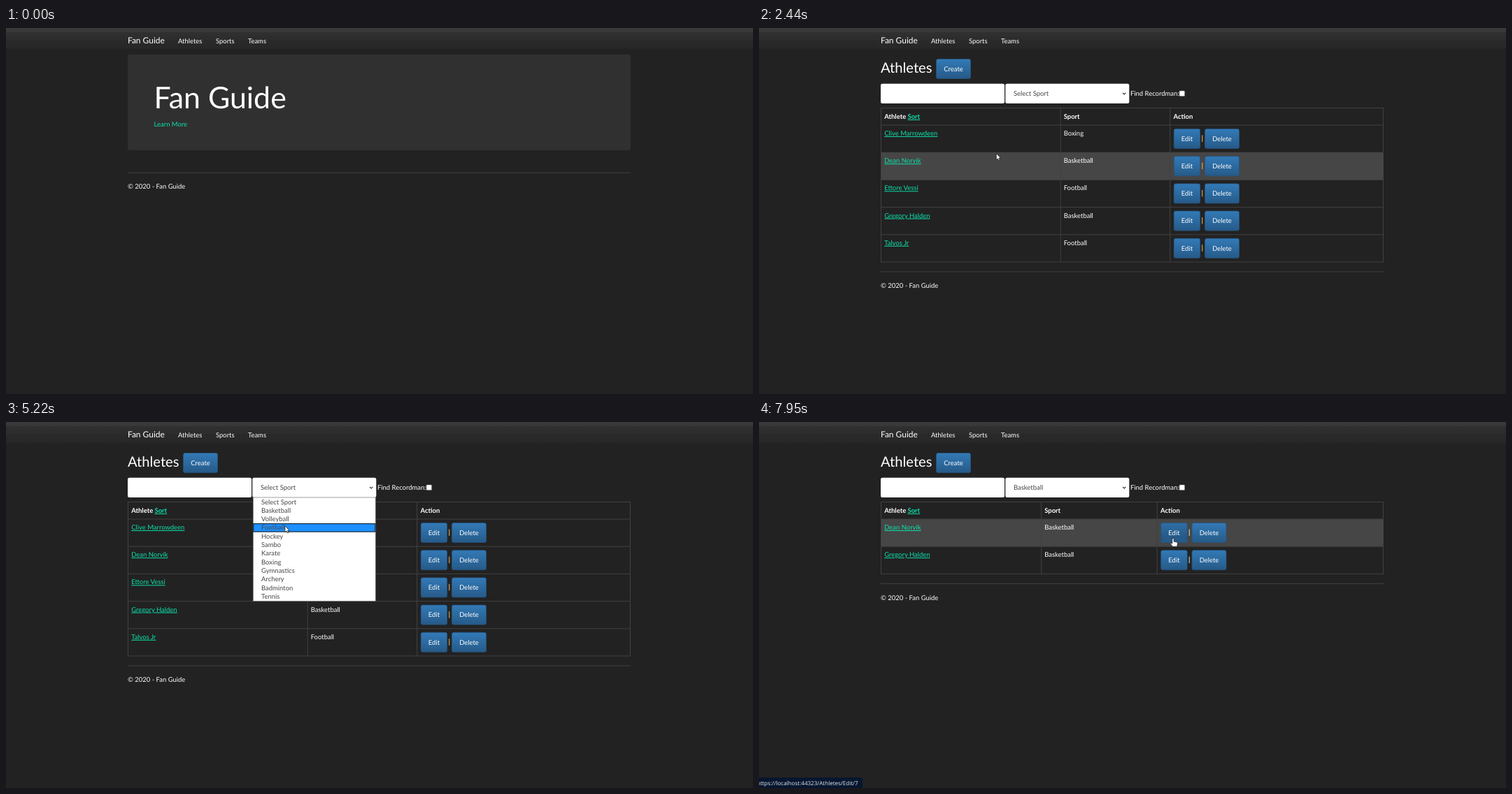
An HTML page that plays this animation: 1068 by 524 pixels, repeating every 8 s.

```html
<!DOCTYPE html>
<html lang="en">
<head>
<meta charset="utf-8">
<title>Fan Guide</title>
<style>
html, body { margin: 0; width: 100%; height: 100%; overflow: hidden; background: #222; }
svg { display: block; width: 1068px; height: 524px; }
text { font: 9.46px Lato, sans-serif; fill: #fff; white-space: pre; text-rendering: geometricPrecision; }
.brand { font-size: 11.98px; }
.hero { font-size: 42.9px; }
.title { font-size: 20.2px; }
.bold { font-weight: bold; }
.link { fill: #0ce3ac; }
.under { text-decoration: underline; }
.hover { fill: #34495e; }
.field { fill: #464646; }
.bar { fill: #fff; }
.mid { text-anchor: middle; }
.url { font: 8.06px "Open Sans", "Noto Sans", sans-serif; fill: #e8eaee; }
</style>
</head>
<body>
<svg viewBox="0 0 1068 524">
  <defs>
    <linearGradient id="nav" x2="0" y2="1">
      <stop stop-color="#3a3a3a"/><stop offset=".22" stop-color="#383838"/>
      <stop offset=".22" stop-color="#303030"/><stop offset=".59" stop-color="#2c2c2c"/>
      <stop offset=".59" stop-color="#2a2a2a"/><stop offset="1" stop-color="#272727"/>
    </linearGradient>
    <linearGradient id="btn" x2="0" y2="1">
      <stop stop-color="#337ab7"/><stop offset="1" stop-color="#265a88"/>
    </linearGradient>
    <linearGradient id="btnOver" x2="0" y2="1">
      <stop stop-color="#2e6fa6"/><stop offset=".7" stop-color="#265a88"/>
    </linearGradient>
  </defs>
  <g id="stage"></g>
</svg>
<script>
const LOOP = 8000, ROW = 39.2, ITEM = 12.33;
const stage = document.getElementById('stage');

const athletes = [
  ['Clive Marrowdeen', 'Boxing'], ['Dean Norvik', 'Basketball'], ['Ettore Vessi', 'Football'],
  ['Gregory Halden', 'Basketball'], ['Talvos Jr', 'Football']
];
const sports = ['Select Sport', 'Basketball', 'Volleyball', 'Football', 'Hockey', 'Sambo',
  'Karate', 'Boxing', 'Gymnastics', 'Archery', 'Badminton', 'Tennis'];

// pointer stays: time, x, y
const path = [
  [120, 980, 514], [270, 358, 18], [320, 330, -20],
  [500, 272, -14], [800, 262, 16], [1210, 252, 22], [1380, 252, 22], [1430, 252, 22.5],
  [1800, 252, 22.5], [2400, 339, 180], [2440, 339, 180], [2720, 420, 88], [2840, 420, 88],
  [3220, 502, 203], [3640, 470, 190], [3690, 460, 180], [4040, 288, 56], [4140, 290, 56],
  [4420, 433, 87], [4650, 433, 87], [5270, 396, 154], [5520, 396, 154], [5980, 390, 130],
  [6640, 390, 130], [7110, 575, 89], [7160, 577, 90], [7650, 594, 164], [7900, 592, 167]
];
const clicks = [[1630, 1780], [4520, 4670], [6160, 6310]];
const bubbles = [[1100, 1850, 'Athletes', 122], [4030, 4280, 'Athletes/Create', 150],
  [7600, 8200, 'Athletes/Edit/7', 148]];

const during = (t, [a, b]) => t >= a && t < b;
const clamp = v => Math.max(0, Math.min(1, v));
const text = (x, y, s, cls = '') => `<text x="${x}" y="${y}" class="${cls}">${s}</text>`;
const rect = (x, y, w, h, fill, extra = '') =>
  `<rect x="${x}" y="${y}" width="${w}" height="${h}" fill="${fill}" ${extra}/>`;
const hline = y => rect(174, y, 719, 1, '#414141');

function pointerAt(t) {
  let i = path.findIndex(p => p[0] > t);
  if (i < 0) i = path.length;
  if (!i) return [-50, -50];
  const a = path[i - 1], b = path[i] || a;
  const k = b === a ? 0 : (t - a[0]) / (b[0] - a[0]);
  return [a[1] + (b[1] - a[1]) * k, a[2] + (b[2] - a[2]) * k];
}

function draw(t) {
  const [px, py] = pointerAt(t);
  const open = during(t, [4580, 6380]);
  let hand = false;

  const over = (x, y, w, h) => !open && px >= x && px < x + w && py >= y && py < y + h;
  const hot = (...box) => {
    const on = over(...box);
    hand = hand || on;
    return on;
  };
  const button = (x, y, w, label) =>
    rect(x + .5, y + .5, w - 1, 28, hot(x, y, w, 29) ? 'url(#btnOver)' : 'url(#btn)',
      'rx="2.5" stroke="#245580" stroke-width=".8"') +
    text(x + w / 2, y + 17.7, label, 'mid');
  const footer = y => hline(y) + text(174, y + 23.7, '© 2020 - Fan Guide');

  function navbar() {
    const item = (x, w, label) => text(x, 21.6, label, hot(x, 13, w, 14) ? 'hover' : '');
    return rect(0, 0, 1068, 29.5, 'url(#nav)') + text(174, 21.8, 'Fan Guide', 'brand') +
      item(246, 35, 'Athletes') + item(300, 27, 'Sports') + item(346, 27, 'Teams');
  }

  function home() {
    return rect(174, 38, 719, 137, '#303030', 'rx="3.5"') +
      text(211.5, 115, 'Fan Guide', 'hero') + text(211.5, 141.3, 'Learn More', 'link') + footer(206.7);
  }

  function form(picked) {
    return text(174, 64, 'Athletes', 'title') + button(253, 44, 50, 'Create') +
      rect(174, 79.7, 177, 28.3, '#fff', 'rx="2.5"') + rect(352.3, 79.7, 177, 28.3, '#fff', 'rx="2.5"') +
      text(364, 97.3, picked, 'field') +
      '<path d="M520 92.8l2.2 2.2 2.2-2.2" fill="none" stroke="#333" stroke-width="1.2"/>' +
      text(531, 97.3, 'Find Recordman:') +
      rect(601, 90, 7.6, 7.6, '#fff', 'rx="1.2" stroke="#767676" stroke-width=".5"');
  }

  function table(rows, col2, col3, mark) {
    const bottom = 139 + ROW * rows.length;
    let s = '';
    rows.forEach(([name, sport], i) => {
      const y = 139 + ROW * i;
      if (over(174, y, 719, ROW)) s += rect(174, y, 719, ROW, '#464646');
      hot(179, y + 6, name.length * 4.8, 12);
      s += text(179.2, y + 15, name, 'link under') + text(col2 + 5, y + 15, sport) +
        button(col3 + 5.5, y + 5, 38.5, 'Edit') + button(col3 + 49.8, y + 5, 50, 'Delete') +
        rect(col3 + 46, y + 14.5, 1.1, 9.5, mark) + hline(y + ROW - .5);
    });
    for (const x of [174, col2, col3, 892]) s += rect(x, 114, 1, bottom - 114, '#414141');
    return s + hline(114) + hline(138.5) +
      text(179.2, 130, 'Athlete <tspan class="link under">Sort</tspan>', 'bold') +
      text(col2 + 5, 130, 'Sport', 'bold') + text(col3 + 5.3, 130, 'Action', 'bold') +
      footer(bottom + 13.5);
  }

  function dropdown() {
    const top = 108, item = Math.floor((py - top) / ITEM);
    const on = item >= 0 && item < sports.length ? item : 0;
    return rect(353.3, top, 175, 148.3, '#fff', 'stroke="#777" stroke-width=".7"') +
      rect(353.8, top + .6 + ITEM * on, 174, ITEM - .8, '#1e90ff', 'stroke="#102030" stroke-width="1.1"') +
      sports.map((s, i) => text(365, 117.5 + ITEM * i, s, 'field')).join('');
  }

  function pointer() {
    const shape = hand
      ? 'M-1.2 0Q0-1.2 1.2 0V4.2L5.4 5Q6.6 5.4 6.5 7L5.6 11.5H-.4L-3.8 7.2Q-3.6 5.4-1.2 7Z'
      : 'M0 0V9.2L2.1 7.3 3.5 10.4 5 9.7 3.6 6.7H6.4Z';
    return `<path transform="translate(${px} ${py})" d="${shape}" fill="#fff" stroke="#111" stroke-width=".7"/>`;
  }

  function bubble([from, to, page, width]) {
    const alpha = clamp((t - from) / 200) * clamp((to - t) / 80);
    return alpha ? `<g opacity="${alpha}">` +
      rect(-4, 509, width + 4, 19, '#06162e', 'rx="2"') +
      text(-3, 519.5, 'https://localhost:44323/' + page, 'url') + '</g>' : '';
  }

  let s = navbar();
  if (t < 1800) s += home();
  else {
    s += form(t < 6310 ? 'Select Sport' : 'Basketball');
    s += t < 6600 ? table(athletes, 430.7, 587.2, '#dcae62')
      : table(athletes.filter(a => a[1] === 'Basketball'), 403.2, 568.7, '#ccc');
    if (open) s += dropdown();
  }
  s += bubbles.map(bubble).join('') + pointer();
  if (clicks.some(c => during(t, c)))
    s += `<circle cx="${px - .5}" cy="${py}" r="8.5" fill="#f5e61e" opacity=".6"/>`;
  stage.innerHTML = s;
}

const start = performance.now();
function tick() {
  draw((performance.now() - start) % LOOP);
  requestAnimationFrame(tick);
}
tick();
</script>
</body>
</html>
```
